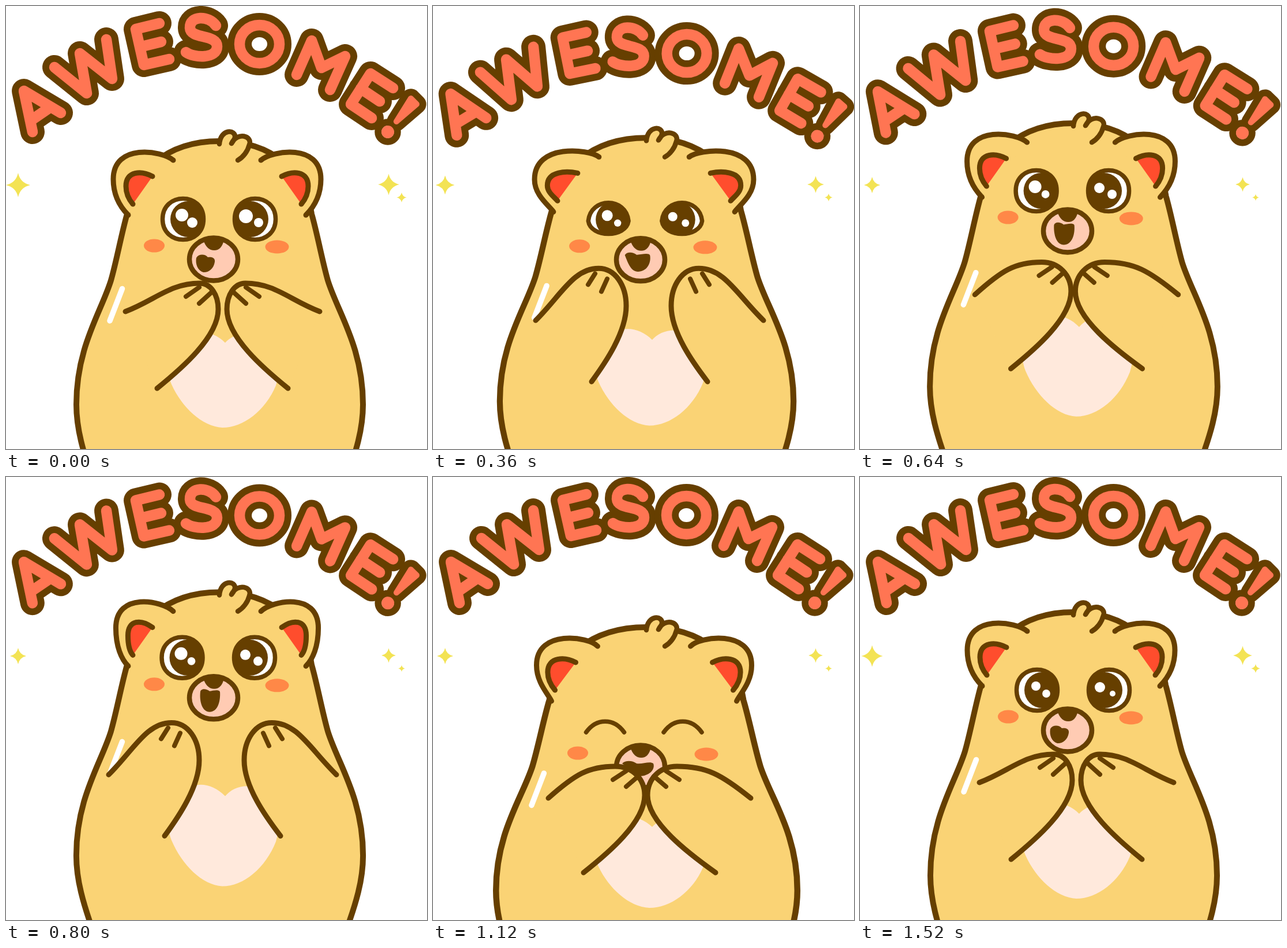
Recreate the animation shown at these times as an HTML page with a canvas. Size 730x767 px, loop 1560 ms.

```html
<!DOCTYPE html>
<html lang="en">
<head>
<meta charset="utf-8">
<title>Awesome!</title>
<style>
  html, body { margin: 0; width: 100%; height: 100%; overflow: hidden; background: #fff; }
  canvas { display: block; }
</style>
</head>
<body>
<canvas id="stage" width="730" height="767" role="img" aria-label="AWESOME!"></canvas>
<script>
const ctx = document.getElementById('stage').getContext('2d');
const LOOP = 1560, STEP = 40;
const BROWN = '#663f00', FUR = '#fad375', CORAL = '#ff7553', CREAM = '#ffe9dc',
      PINK = '#ffcbb3', BLUSH = '#ff8847', RED = '#ff4d2d', GOLD = '#f3e354';

const clamp = v => Math.min(1, Math.max(0, v));
const ease = v => { v = clamp(v); return v * v * (3 - 2 * v); };
const wave = (t, period) => Math.cos(2 * Math.PI * t / period);

// Lettering: centre of each letter and its stroke skeleton
const LETTERS = [
  ['A', 60, 183, 'M46 218L31 147L95 185M42 199L77 175'],
  ['W', 134, 104, 'M84 106L140 151L128 82L184 126L174 58'],
  ['E', 252, 67, 'M266 30L225 40L239 102L283 92M232 71L269 62'],
  ['S', 341, 54, 'M364 34C352 16 318 16 319 38C320 58 366 48 366 70C366 92 326 90 312 80'],
  ['O', 439.5, 66, 'M405 66a34.5 33 0 1 0 69 0a34.5 33 0 1 0-69 0Z'],
  ['M', 546, 102, 'M504 119L530 60L547 107L588 87L562 145'],
  ['E', 634, 155, 'M671 142L632 117L598 170L634 194M615 143L648 165'],
  ['!', 685, 191, 'M702 160L712 170L677 200ZM656 218a6 6 0 1 0 12 0a6 6 0 1 0-12 0Z']
].map(([char, x, y, d]) => ({ char, x, y, path: new Path2D(d) }));

const BODY = new Path2D('M158 840C132 770 122 730 122 690C122 590 165 530 182 475' +
  'C192 440 200 395 210 360C220 290 275 234 370 234C465 234 520 290 530 360' +
  'C540 395 548 440 558 475C575 530 619 590 619 690C619 730 609 770 582 840Z');
const HEART = new Path2D('M380 583C365 568 345 562 330 565C295 572 270 610 287 655' +
  'C305 695 340 728 375 730C412 730 450 700 468 657C485 610 455 570 425 567C405 565 390 572 380 583Z');
const HAIR = new Path2D('M370 239C372 212 399 213 397 228Q395 233 391 238' +
  'C401 217 428 225 422 240C419 252 411 262 402 267');
const NOSE = new Path2D('M342 405Q360 396 378 405Q374 423 361 423Q348 423 342 405Z');
const STAR = new Path2D('M0-1Q.18-.18 1 0Q.18.18 0 1Q-.18.18-1 0Q-.18-.18 0-1Z');

const MOUTH = {
  rest: [330, 436, 334, 429, 345, 429, 350, 435, 357, 434, 363, 436, 362, 443,
         360, 456, 350, 462, 342, 461, 332, 458, 328, 446],
  smile: [328, 433, 334, 427, 346, 428, 353, 433, 362, 435, 376, 428, 382, 433,
          386, 444, 374, 455, 358, 455, 346, 455, 342, 443],
  open: [337, 428, 338, 422, 347, 422, 353, 427, 359, 426, 371, 423, 371, 429,
         372, 447, 366, 463, 353, 463, 341, 463, 335, 447]
};

// Shoulder, top of paw, side of paw, elbow, first finger, finger direction, bulge
const ARM = {
  rest:   [207, 529, 336, 480, 368, 525, 262, 662, 335, 487, -23, 16, .4],
  closed: [200, 530, 316, 475, 367, 525, 261, 659, 335, 483, -23, 15, .75],
  open:   [178, 550, 287, 460, 335, 525, 275, 656, 281, 469, -12, 19, .48]
};

const blend = (a, wa, b, wb, c, wc) => a.map((v, i) => v * wa + b[i] * wb + c[i] * wc);

function paint(path, fill, width, color = BROWN) {
  if (fill) { ctx.fillStyle = fill; ctx.fill(path); }
  if (width) { ctx.lineWidth = width; ctx.strokeStyle = color; ctx.stroke(path); }
}

function oval(x, y, rx, ry, fill, width) {
  const p = new Path2D();
  p.ellipse(x, y, rx, ry, 0, 0, 7);
  paint(p, fill, width);
}

function line(x1, y1, x2, y2, width, color) {
  paint(new Path2D(`M${x1} ${y1}L${x2} ${y2}`), null, width, color);
}

function placed(dx, dy, draw, sx = 1, sy = 1) {
  ctx.save();
  ctx.translate(dx, dy);
  ctx.scale(sx, sy);
  draw();
  ctx.restore();
}

// Pose weights: squash, lift, and the rest pose for what remains
function poseAt(t) {
  let squash, lift = 0;
  if (t < 200) squash = ease(t / 160);
  else if (t < 960) {
    lift = 1 - (1 - clamp((t - 200) / 740)) ** 3;
    squash = 1 - lift;
  } else if (t < 1120) {
    squash = ease((t - 960) / 160);
    lift = 1 - squash;
  } else squash = 1 - ease((t - 1120) / 360);
  return { squash, lift, rest: 1 - squash - lift };
}

// 1 when the paws meet, 0 when they are apart
function clapAt(t) {
  if (t < 160 || t >= 1120) return 1;
  const p = t % 480;
  return p < 150 ? ease(p / 150) : 1 - ease((p - 150) / 90);
}

const EAR_KEYS = [[0, 0], [200, 1], [480, .6], [640, 0], [960, -1], [1120, 0], [LOOP, 0]];
function earAt(t) {
  const i = EAR_KEYS.findIndex(k => k[0] > t);
  const [t0, a] = EAR_KEYS[i - 1], [t1, b] = EAR_KEYS[i];
  return a + (b - a) * ease((t - t0) / (t1 - t0));
}

function title(t) {
  const bend = t < 200 ? ease(t / 200) : clamp(1 - (t - 200) / 700) ** 2;
  for (const layer of ['edge', 'face']) {
    for (const { char, x, y, path } of LETTERS) {
      const u = (x - 367) / 310, width = char === '!' ? 10 : 18.5;
      ctx.save();
      ctx.translate(x + 4.5 * u * bend, y + (28 - 17 * u * u) * bend);
      ctx.rotate(-.103 * u * bend);
      ctx.translate(-x, -y);
      if (layer === 'edge') paint(path, null, width + 23.5);
      else paint(path, char === '!' ? CORAL : null, width, CORAL);
      ctx.restore();
    }
  }
}

function stars(t) {
  const k = .78 + .22 * wave(t, 480);
  for (const [x, y, r] of [[21, 310, 21], [663.5, 309, 18.5], [686, 331.5, 8.5]])
    placed(x, y, () => paint(STAR, GOLD), r * k, r * k);
}

function ear(droop, wide) {
  const tip = 186 - 9 * droop - wide * .5, d = 8 * droop;
  paint(new Path2D(`M${290 - wide * .35} 267C270 ${250 + d / 2} ${tip} ${237 + d} ${tip} ${300 + d}` +
    `C${tip} ${330 + d / 2} 200 350 ${212 - wide * .5} 362`), FUR, 9);
  const x = 254 - wide * .5, end = 220 - wide * .65, left = 208 - 7 * droop - wide * .7;
  paint(new Path2D(`M${x} 295C${x - 19} ${285 + d} ${left} ${285 + d} ${left} ${312 + d * .75}` +
    `C${left} ${325 + d / 2} ${end - 6} 336 ${end} 343`), RED, 9);
}

function eye(x, open, pupil, lights) {
  const side = 33 + 2.5 * open, cx = 15 + 20.5 * open, y = 10 * (1 - open),
        top = -15 - 32.3 * open, low = -15 + 62.3 * open;
  const lid = new Path2D(`M${-side} ${y}C${-cx} ${top} ${cx} ${top} ${side} ${y}` +
    `C${cx} ${low} ${-cx} ${low} ${-side} ${y}Z`);
  placed(x, 369, () => {
    if (open > .02) {
      paint(lid, '#fff');
      ctx.save();
      ctx.clip(lid);
      oval(pupil, 0, 31, 31, BROWN);
      for (const [lx, ly, r] of lights) oval(lx, ly, r, r, '#fff');
      ctx.restore();
    }
    paint(lid, null, 7.5);
  });
}

function face(t, { squash, lift, rest }) {
  const open = 1 - ease((squash - .25) / .72);
  const fast = wave(t, 160), slow = wave(t, 240);
  oval(257 - 6 * squash, 415, 18, 11.5, BLUSH);
  oval(470 + 4 * squash, 417, 20.5, 11.5, BLUSH);
  eye(307 - 1.5 * lift - 8.5 * (1 - open), open, 9,
    [[-2, -7, 9.5 + 1.5 * fast], [16, 6, 7.6 + 1.4 * slow]]);
  eye(432 - lift + 1 - open, open, -8,
    [[-16, -5, 10 + 2 * slow], [6, 6, 6.5 + 1.5 * fast]]);
  oval(360, 438.5, 42, 37, PINK, 8.5);
  paint(NOSE, BROWN);
  const m = blend(MOUTH.rest, rest, MOUTH.smile, squash, MOUTH.open, lift);
  paint(new Path2D(`M${m[0]} ${m[1]}C${m.slice(2).join(' ')} ${m[0]} ${m[1]}Z`), BROWN);
}

function arm(points, reach) {
  let [sx, sy, px, py, rx, ry, ex, ey, fx, fy, dx, dy, bulge] = points;
  px += reach; rx += reach; fx += reach;
  const w = px - sx, down = ey - ry;
  paint(new Path2D(`M${sx} ${sy}C${sx + .4 * w} ${sy + bulge * (py - sy)} ${px - .4 * w} ${py} ${px} ${py}` +
    `C${px + .6 * (rx - px)} ${py} ${rx} ${ry - .55 * (ry - py)} ${rx} ${ry}` +
    `C${rx} ${ry + .35 * down} ${ex + .4 * (rx - ex)} ${ey - .25 * down} ${ex} ${ey}`), FUR, 9);
  line(fx, fy, fx + dx, fy + dy, 8);
  line(fx + 21, fy + 9, fx + 23 + dx, fy + 12 + dy, 8);
}

function bear(t) {
  const pose = poseAt(t), { squash, lift, rest } = pose;
  const rise = 26 * squash - 35 * lift, wide = 13 * squash, droop = earAt(t);
  const stretch = 1 + wide / 253;

  placed(370 * (1 - stretch), rise, () => paint(BODY, FUR, 10), stretch);
  placed(0, rise, () => ear(droop, wide));
  placed(732, rise, () => ear(droop, wide), -1);
  placed(0, rise, () => paint(HAIR, FUR, 8.5));
  placed(0, rise * 1.911, () => paint(HEART, CREAM), 1, 1 - rise * .00177);
  placed(-wide * .7, rise * .9, () => line(201.5, 489.5, 180, 545, 9.5, '#fff'));
  placed(0, 63 * squash - 57 * lift, () => face(t, pose));

  const clap = clapAt(t), active = 1 - rest;
  const points = blend(ARM.rest, rest, ARM.closed, active * clap, ARM.open, active * (1 - clap));
  placed(0, rise, () => arm(points, 0));
  placed(751, rise, () => arm(points, active * (3 + 9 * clap)), -1);
}

function frame() {
  const t = Math.floor(performance.now() % LOOP / STEP) * STEP;
  ctx.fillStyle = '#fff';
  ctx.fillRect(0, 0, 730, 767);
  ctx.lineCap = ctx.lineJoin = 'round';
  title(t);
  stars(t);
  bear(t);
  requestAnimationFrame(frame);
}
frame();
</script>
</body>
</html>
```
